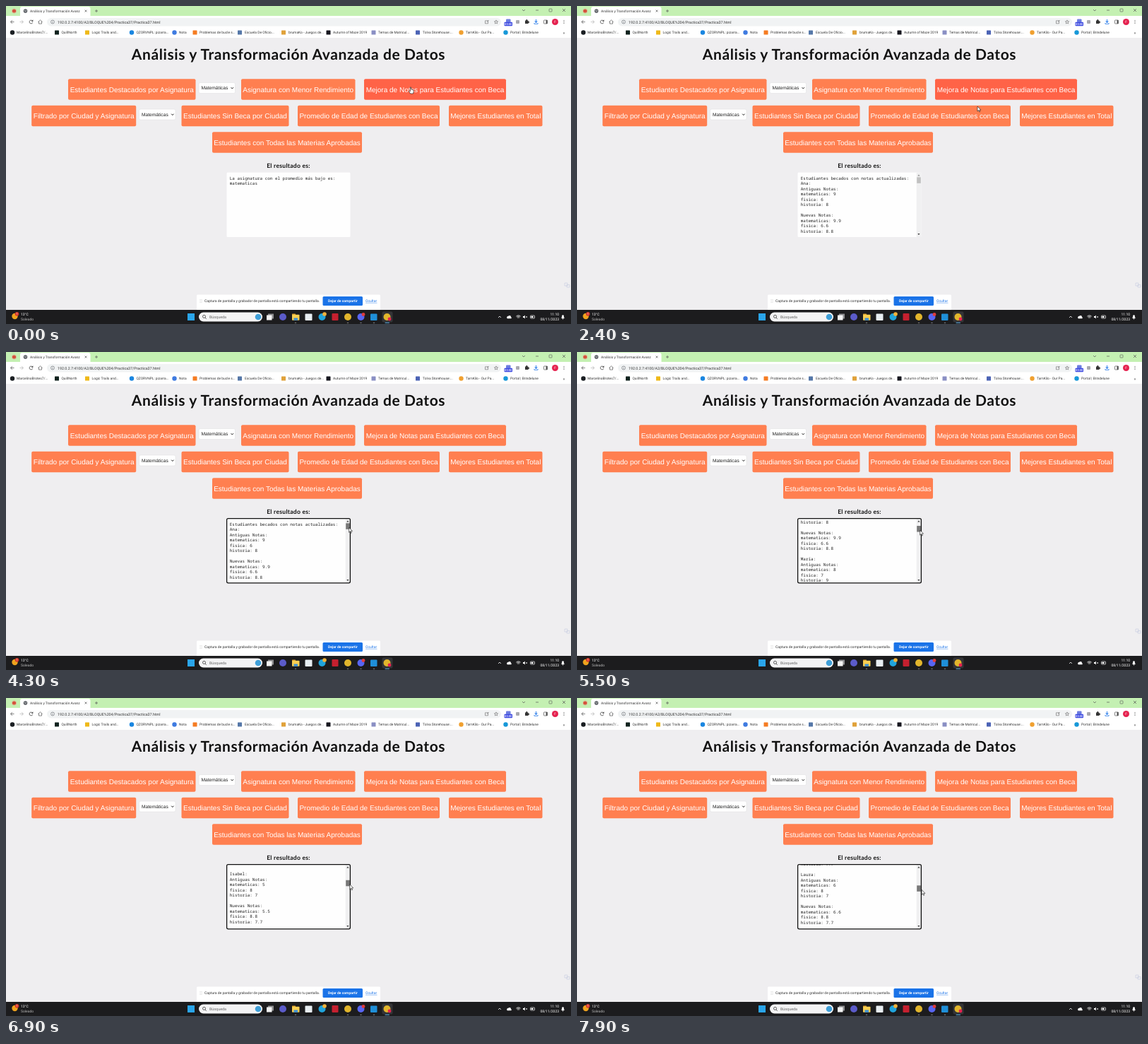
Recreate the animation shown at these times as an HTML page with a canvas. Size 800 by 450 pixels, loop 8000 ms.

```html
<!DOCTYPE html>
<html lang="es">
<head>
<meta charset="utf-8">
<title>Análisis y Transformación Avanzada de Datos</title>
<style>
html, body { margin: 0; width: 100%; height: 100%; overflow: hidden; background: #efeef0; }
canvas { display: block; width: 800px; height: 450px; }
</style>
</head>
<body>
<canvas id="stage"></canvas>
<script>
const canvas = document.getElementById('stage');
const c = canvas.getContext('2d');
const dpr = window.devicePixelRatio || 1;
canvas.width = 800 * dpr;
canvas.height = 450 * dpr;

const LOOP = 8000;
const ARIAL = '"Liberation Sans", Arial, sans-serif';
const UI = 'Roboto, "Open Sans", sans-serif';
const MONO = '"Noto Sans Mono", "DejaVu Sans Mono", monospace';
const ROUND = 'Lato, "Open Sans", sans-serif';
const CORAL = [255, 127, 80], TOMATO = [255, 99, 71];

function rect(x, y, w, h, fill, r = 0) {
  c.fillStyle = fill;
  c.beginPath();
  c.roundRect(x, y, w, h, r);
  c.fill();
}

function frame(x, y, w, h, color, lw = 0.6, r = 0) {
  c.strokeStyle = color;
  c.lineWidth = lw;
  c.beginPath();
  c.roundRect(x, y, w, h, r);
  c.stroke();
}

function disc(x, y, r, fill) {
  c.fillStyle = fill;
  c.beginPath();
  c.arc(x, y, r, 0, 7);
  c.fill();
}

function ring(x, y, r, color, lw = 0.7, a = 0, b = 6.3) {
  c.strokeStyle = color;
  c.lineWidth = lw;
  c.beginPath();
  c.arc(x, y, r, a, b);
  c.stroke();
}

// Polyline through a flat list of offsets from (x, y)
function trace(x, y, pts) {
  c.beginPath();
  for (let i = 0; i < pts.length; i += 2) c.lineTo(x + pts[i], y + pts[i + 1]);
}

function line(x, y, pts, color = '#555', lw = 0.7) {
  trace(x, y, pts);
  c.strokeStyle = color;
  c.lineWidth = lw;
  c.stroke();
}

function poly(x, y, pts, fill) {
  trace(x, y, pts);
  c.closePath();
  c.fillStyle = fill;
  c.fill();
}

function text(s, x, y, size, color, { font = UI, weight = 400, align = 'left', gap = 0 } = {}) {
  c.font = `${weight} ${size}px ${font}`;
  c.letterSpacing = gap + 'px';
  c.textRendering = 'geometricPrecision';
  c.textAlign = align;
  c.fillStyle = color;
  c.fillText(s, x, y);
}

function clipped(x, y, w, h, draw) {
  c.save();
  c.beginPath();
  c.rect(x, y, w, h);
  c.clip();
  draw();
  c.restore();
}

// Piecewise linear value at t from [time, value] pairs
function track(keys, t) {
  if (t <= keys[0][0]) return keys[0][1];
  for (let i = 1; i < keys.length; i++) {
    const [t0, v0] = keys[i - 1], [t1, v1] = keys[i];
    if (t <= t1) return v0 + (v1 - v0) * (t - t0) / (t1 - t0);
  }
  return keys[keys.length - 1][1];
}

const mix = (a, b, k) => `rgb(${a.map((v, i) => Math.round(v + (b[i] - v) * k))})`;

const bookmarks = [
  [9, 15, '#1b1f23', 'disc', 'MarcelinoBrotes7/...'],
  [72, 78.5, '#10231f', 'box', 'QuillNorth'],
  [115, 121.5, '#efb919', 'box', 'Logic Trails and...'],
  [178, 184.5, '#1a86e0', 'disc', 'QZORVNPL: pizarra...'],
  [238.5, 245, '#3f7be0', 'disc', 'Nota'],
  [267.5, 274, '#f57c22', 'box', 'Problemas de bucle s...'],
  [331, 338, '#5577a8', 'box', 'Escuela De Oficio...'],
  [393, 400, '#e0a23a', 'box', 'brumaKo - Juegos de...'],
  [456.5, 463, '#17171f', 'box', 'Autumn of Maze 2019'],
  [520.5, 527, '#8a8fc4', 'box', 'Temas de Matricul...'],
  [583, 590, '#4b63b5', 'box', 'Tolva Storehouse:...'],
  [644.5, 651, '#f0a030', 'disc', 'TarnKilo - Our Pa...'],
  [707.5, 714, '#1798d8', 'disc', 'Portal | Brindelune']
];

function browser() {
  rect(0, 0, 800, 14, '#c4f0b2');
  disc(11.5, 7, 2.6, '#d5523c');
  ring(11.5, 7, 3.2, '#e8a08c', 0.6);
  rect(20, 1, 99.5, 14, '#fff', [3, 3, 0, 0]);
  disc(27.5, 7, 2.8, '#5f6368');
  line(27.5, 7, [-2, -0.8, 0, 0.4, 1.8, -0.6], '#fff', 0.6);
  clipped(33, 0, 72, 14, () =>
    text('Análisis y Transformación Avanzada', 34, 8.8, 4.9, '#333'));
  line(113, 7, [-1.4, -1.4, 1.4, 1.4]);
  line(113, 7, [-1.4, 1.4, 1.4, -1.4]);
  line(128, 7, [-2, 0, 2, 0]);
  line(128, 7, [0, -2, 0, 2]);
  line(733, 6, [-2, -1, 0, 1, 2, -1]);
  line(752, 6, [-2, 0, 2, 0]);
  frame(769, 4, 4, 4, '#555', 0.6, 0.6);
  line(790, 6, [-2, -2, 2, 2]);
  line(790, 6, [-2, 2, 2, -2]);

  rect(0, 14, 800, 31, '#fff');
  line(9, 22.5, [2.5, 0, -2.5, 0, 0, -2.5]);
  line(9, 22.5, [-2.5, 0, 0, 2.5]);
  line(22, 22.5, [-2.5, 0, 2.5, 0, 0, -2.5], '#b5b5b5');
  line(22, 22.5, [2.5, 0, 0, 2.5], '#b5b5b5');
  ring(35.5, 22.5, 2.4, '#444', 0.8, 0.3, 5.4);
  poly(37.5, 20.5, [0.8, -1.2, 0.8, 1.4, -1.6, 1.4], '#444');
  line(48.5, 22.5, [-3, 0, 0, -2.7, 3, 0]);
  line(48.5, 22.5, [-2, -0.6, -2, 2.6, 2, 2.6, 2, -0.6]);

  rect(58, 17, 643, 11.5, '#f1f3f4', 5.7);
  ring(66, 22.5, 2.5, '#5f6368', 0.6);
  line(66, 22.5, [0, -0.2, 0, 1.5], '#5f6368', 0.6);
  disc(66, 21.2, 0.4, '#5f6368');
  text('192.0.2.7:4100/A2/BLOQUE%204/Practica37/Practica37.html', 73, 24.5, 5.3, '#333');
  frame(678.5, 20.8, 4, 4, '#666', 0.6);
  line(681, 22.5, [0, 0, 2.5, -2.5], '#666');
  const star = [];
  for (let i = 0; i <= 10; i++) {
    const r = i % 2 ? 1.2 : 2.8, a = i * Math.PI / 5 - Math.PI / 2;
    star.push(r * Math.cos(a), r * Math.sin(a));
  }
  line(694, 22.7, star, '#666', 0.6);
  rect(708, 18.5, 6.5, 5, '#6d7de0', 1);
  rect(705.5, 22.8, 11.5, 5.4, '#3b48e0', 1);
  text('00:00', 711.2, 27, 4, '#fff', { align: 'center', weight: 500 });
  rect(722, 20, 5, 5, '#a9a9b0', 1);
  rect(735, 20.5, 4.6, 4.6, '#333', 0.5);
  disc(737.3, 20.2, 1.1, '#333');
  disc(740, 22.8, 1.1, '#333');
  line(750.5, 22, [0, -3, 0, 1.5], '#1a73e8', 1);
  line(750.5, 22, [-2, -0.5, 0, 1.5, 2, -0.5], '#1a73e8', 1);
  line(750.5, 22, [-2.6, 2, -2.6, 3.3, 2.6, 3.3, 2.6, 2], '#1a73e8', 0.8);
  frame(761.5, 20, 5, 5, '#555', 0.7, 0.5);
  rect(764.5, 20, 2, 5, '#555');
  disc(777.5, 22.5, 4.5, '#e5224f');
  text('F', 777.5, 24.3, 4.6, '#fff', { align: 'center' });
  [-2, 0, 2].forEach(d => disc(790, 22.5 + d, 0.6, '#444'));

  for (const [ix, tx, color, kind, label] of bookmarks) {
    if (kind === 'disc') disc(ix, 37.5, 3.2, color);
    else rect(ix - 3, 34.5, 6, 6, color, 0.6);
    text(label, tx, 39.2, 4.9, '#333');
  }
  text('»', 788.5, 39.5, 6, '#444');
}

function button(x, y, w, label, hover = 0) {
  rect(x, y, w, 29.5, mix(CORAL, TOMATO, hover), 2);
  text(label, x + w / 2, y + 18.2, 10, '#fff', { font: ARIAL, align: 'center' });
}

function picker(x, y) {
  rect(x, y, 51.5, 15, '#fff', 2);
  frame(x, y, 51.5, 15, '#dcdcdf', 0.5, 2);
  text('Matemáticas', x + 3.5, y + 9.9, 6.67, '#222', { font: ARIAL });
  line(x + 47.3, y + 7.6, [-1.7, -0.9, 0, 0.9, 1.7, -0.9], '#222', 1);
}

function page(hover) {
  rect(0, 45, 800, 385, '#efeef0');
  text('Análisis y Transformación Avanzada de Datos', 400, 76, 21, '#111',
    { font: ROUND, weight: 700, align: 'center', gap: 0.6 });
  button(88, 103.3, 180.5, 'Estudiantes Destacados por Asignatura');
  picker(273, 108.5);
  button(333, 103.3, 161.5, 'Asignatura con Menor Rendimiento');
  button(507, 103.3, 201, 'Mejora de Notas para Estudiantes con Beca', hover);
  button(36.2, 140.8, 148, 'Filtrado por Ciudad y Asignatura');
  picker(188.5, 146);
  button(248.5, 140.8, 152, 'Estudiantes Sin Beca por Ciudad');
  button(413, 140.8, 201, 'Promedio de Edad de Estudiantes con Beca');
  button(627, 140.8, 132.5, 'Mejores Estudiantes en Total');
  button(292, 178.3, 212, 'Estudiantes con Todas las Materias Aprobadas');
  text('El resultado es:', 400, 228.8, 8.6, '#111',
    { font: ROUND, weight: 700, align: 'center', gap: 0.25 });
  frame(791, 392, 4, 4, '#c3cbe0', 0.6);
  frame(794, 394.5, 4, 3.5, '#c3cbe0', 0.6);
}

const students = [
  ['Ana', 9, 6, 8], ['María', 8, 7, 9], ['Isabel', 5, 8, 7], ['Laura', 6, 8, 7]
];
const subjects = ['matematicas', 'fisica', 'historia'];
const before = ['La asignatura con el promedio más bajo es:', 'matematicas'];
const after = ['Estudiantes becados con notas actualizadas:'];
for (const [name, ...marks] of students) {
  const list = k => subjects.map((s, i) => `${s}: ${+(marks[i] * k).toFixed(1)}`);
  after.push(name + ':', 'Antiguas Notas:', ...list(1), '', 'Nuevas Notas:', ...list(1.1), '');
}

function results(lines, scroll, bar, focus, thumb) {
  rect(312.5, 235.5, 175, 91.5, '#fefefe', 1.5);
  clipped(313, 236, 168, 90, () => lines.forEach((s, i) =>
    text(s, 316.8, 245.5 + i * 7.5 - scroll, 5.95, '#222', { font: MONO })));
  if (bar) {
    rect(480.7, 235.5, 6.8, 91.5, '#f0f0f1');
    poly(483.9, 239.5, [-1.6, 0.9, 0, -1, 1.6, 0.9], focus ? '#333' : '#888');
    poly(483.9, 323, [-1.6, -0.9, 0, 1, 1.6, -0.9], '#333');
    rect(481.2, 242.3 + scroll / 10.8, 5.6, 8.5, thumb);
  }
  if (focus) frame(312.6, 235.6, 174.8, 91.2, '#101010', 1.3, 2);
}

function shareBar() {
  rect(270, 408.5, 260, 21.5, '#fff', [1.5, 1.5, 0, 0]);
  for (let i = 0; i < 3; i++) {
    disc(275, 415.5 + i * 2, 0.4, '#999');
    disc(277, 415.5 + i * 2, 0.4, '#999');
  }
  text('Captura de pantalla y grabador de pantalla está compartiendo tu pantalla.',
    281, 419.3, 5, '#333');
  rect(448.5, 411, 56.5, 13, '#1a73e8', 1.5);
  text('Dejar de compartir', 476.8, 419.3, 5, '#fff', { weight: 700, align: 'center' });
  text('Ocultar', 509, 419.3, 5, '#1a73e8');
  line(509, 420.3, [0, 0, 16.5, 0], '#1a73e8', 0.4);
}

function taskbar() {
  rect(0, 430, 800, 20, '#1c1c1e');
  disc(12.5, 439, 4.2, '#f0a31e');
  disc(15.5, 435.8, 2.8, '#d8382c');
  text('1', 15.5, 437.3, 4, '#fff', { align: 'center' });
  text('13°C', 21, 438, 5, '#fff');
  text('Soleado', 21, 445.2, 5, '#b8b8b8');

  rect(257, 435, 10, 10, '#2aa5ea');
  rect(273, 433.5, 90, 13, '#f3f3f4', 6.5);
  ring(280.5, 439.4, 2, '#333', 0.8);
  line(282, 441, [0, 0, 1.7, 1.7], '#333', 0.8);
  text('Búsqueda', 288, 442, 5.4, '#666');
  disc(357, 440, 4.3, '#3f9fd8');

  rect(371, 435.5, 8, 7, '#8d8d8f');
  rect(369, 437.5, 7.5, 7, '#f3f3f3');
  disc(392, 440, 5, '#5b5bc9');
  rect(405, 435.5, 5, 3, '#e0a22a', 0.6);
  rect(405, 436.8, 10.5, 8, '#f8cf52', 0.8);
  rect(407.5, 441.5, 5.5, 3.3, '#3a8fd6');
  rect(423.5, 435.5, 10, 9.5, '#e8eef2', 1);
  disc(447.5, 440, 5, '#20a4dc');
  disc(451, 436, 2.8, '#f0b23a');
  rect(461.5, 435, 9, 10, '#c5202f', 1);
  disc(484, 440, 5, '#e2b62c');
  disc(502.5, 440, 5, '#5865f2');
  disc(506, 436.5, 2.4, '#e03b3b');
  rect(516, 435.5, 9.5, 9.5, '#1f8fd8', 1);
  rect(532.5, 432.5, 15, 15, '#343437', 2);
  disc(539.5, 440, 5, '#e2b62c');
  disc(543, 443, 2.4, '#e5224f');
  [410, 484, 502.5, 521].forEach(x => rect(x - 1.2, 447.8, 2.4, 1, '#8b8b8b', 0.5));
  rect(536.5, 447.8, 6.5, 1, '#5fb5f0', 0.5);

  line(699, 440, [-2, 1, 0, -1, 2, 1], '#fff', 0.8);
  disc(711, 440.5, 1.7, '#fff');
  disc(713, 440, 2, '#fff');
  rect(709.3, 440.3, 6.5, 1.9, '#fff', 0.9);
  [1.5, 3, 4.5].forEach(r => ring(725.5, 442.4, r, '#fff', 0.8, -2.35, -0.8));
  poly(734, 440, [-2, -1, -0.8, -1, 0.8, -2.5, 0.8, 2.5, -0.8, 1, -2, 1], '#fff');
  line(737, 440, [-0.8, -1, 1, 1], '#fff', 0.6);
  line(737, 440, [-0.8, 1, 1, -1], '#fff', 0.6);
  frame(742.5, 438, 6, 4, '#fff', 0.7, 0.8);
  rect(743.5, 439, 3, 2, '#fff');
  text('11:10', 783, 438, 5, '#fff', { align: 'right' });
  text('08/11/2023', 783, 445.2, 5, '#fff', { align: 'right' });
  poly(788.5, 440, [-2.4, 2, -1.6, 0.5, -1.4, -2, 0, -3, 1.4, -2, 1.6, 0.5, 2.4, 2], '#eee');
  disc(788.5, 442.7, 0.8, '#eee');
}

function outlined(x, y, pts) {
  poly(x, y, pts, '#fff');
  trace(x, y, pts);
  c.closePath();
  c.strokeStyle = '#111';
  c.lineWidth = 0.6;
  c.stroke();
}

const arrow = (x, y) =>
  outlined(x, y, [0, 0, 0, 7, 1.6, 5.5, 2.7, 8, 3.8, 7.5, 2.7, 5.1, 4.9, 5.1]);
const hand = (x, y) =>
  outlined(x, y, [-0.7, 0, 0.6, 0, 0.8, 3, 3.8, 3.8, 4.2, 5, 3.6, 9, -0.4, 9, -2.6, 5.6, -1.8, 4.8, -0.7, 6]);

const scrollKeys = [[4900, 0], [5500, 40.5], [5600, 40.5], [6000, 63.5], [6900, 167], [7900, 248.5]];
const driftKeys = [[5500, 485.6], [6900, 486.8], [7900, 488]];

function draw(now) {
  const t = Math.floor(now / 100) * 100;
  const clicked = t >= 1000;
  const pressed = t >= 4300;
  const scroll = track(scrollKeys, t);
  const hover = 1 - track([[2400, 0], [2700, 1]], t);
  const thumb = pressed ? '#787878' : t >= 3500 ? '#a8a8a8' : '#c1c1c1';

  c.setTransform(dpr, 0, 0, dpr, 0, 0);
  browser();
  page(hover);
  results(clicked ? after : before, scroll, clicked, pressed, thumb);
  shareBar();
  taskbar();

  if (t < 2400) hand(573, 115);
  else if (t < 3600) {
    const k = track([[2400, 0], [3600, 1]], t);
    const e = k * k * (3 - 2 * k);
    arrow(567 + (485.6 - 567) * e, 142 + (248.3 - 142) * e);
  } else arrow(track(driftKeys, t), 248.3 + scroll / 10.8);
}

const start = performance.now();
function tick() {
  draw((performance.now() - start) % LOOP);
  requestAnimationFrame(tick);
}
tick();
</script>
</body>
</html>
```
